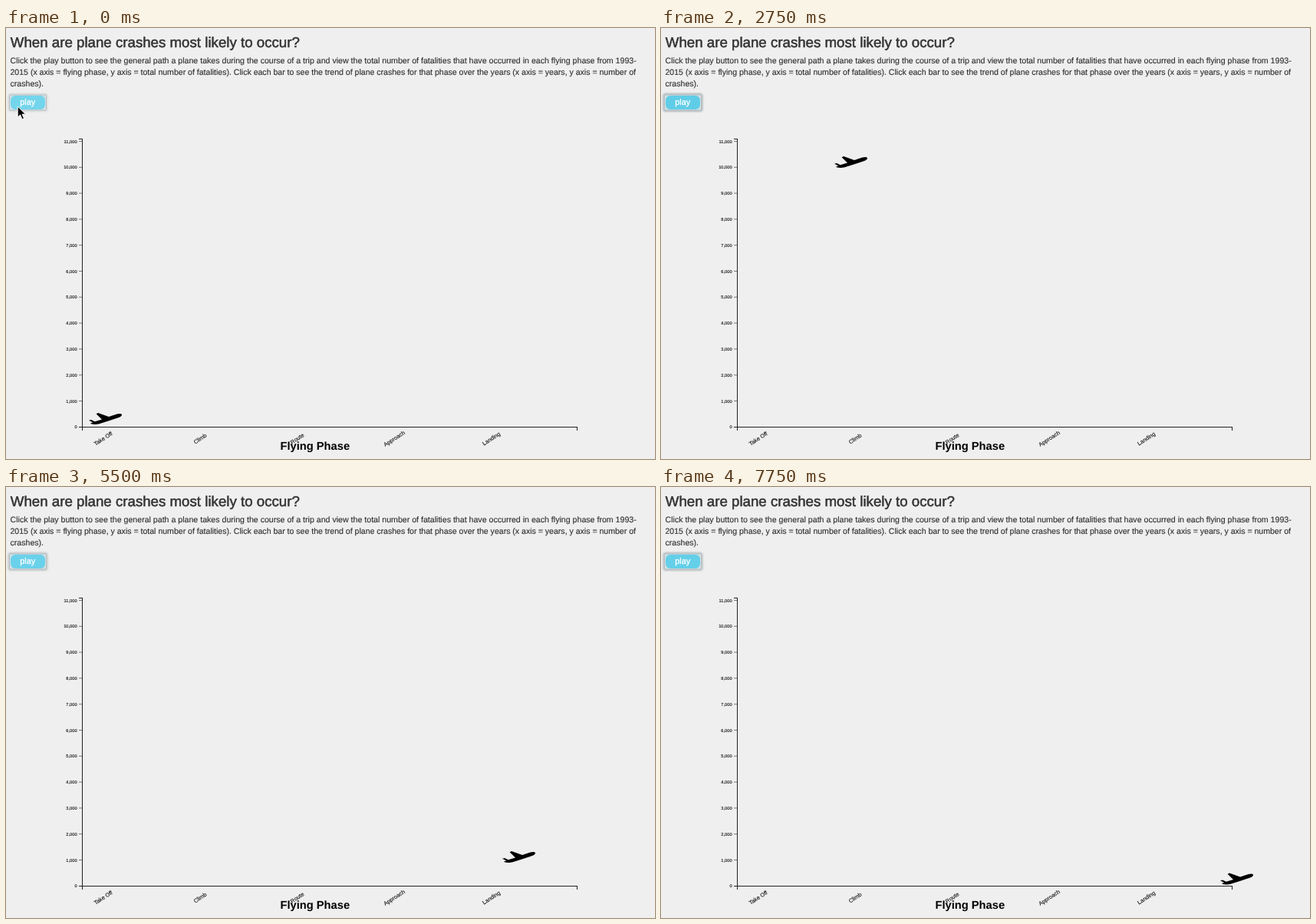
Write an HTML page that moves like this. It is 846x561 px and loops after 8000 ms.

```html
<!DOCTYPE html>
<html lang="en">
<head>
<meta charset="utf-8">
<title>Flying phases</title>
<style>
  html, body { margin: 0; width: 100%; height: 100%; overflow: hidden; background: #efefef; }
  svg { display: block; }
  text { font-family: "Liberation Sans", Arial, sans-serif; text-rendering: geometricPrecision; }
  .body { fill: #333; stroke: #333; stroke-width: .15; }
  .axis { fill: none; stroke: #222; stroke-width: 1; shape-rendering: crispEdges; }
  .tick { stroke: #777; stroke-width: 1; }
  .label { fill: #111; stroke: #111; stroke-width: .12; }
</style>
</head>
<body>
<svg id="stage" width="846" height="561" viewBox="0 0 846 561">
  <defs>
    <filter id="soft" x="-30%" y="-60%" width="160%" height="220%"><feGaussianBlur stdDeviation="1.3"/></filter>
  </defs>
  <rect width="846" height="561" fill="#efefef"/>
  <text x="5.8" y="25" font-size="18.7" fill="#333" stroke="#333" stroke-width=".5">When are plane crashes most likely to occur?</text>
  <g class="body">
    <text x="5.5" y="46" font-size="10.62">Click the play button to see the general path a plane takes during the course of a trip and view the total number of fatalities that have occurred in each flying phase from 1993-</text>
    <text x="5.5" y="61" font-size="10.56">2015 (x axis = flying phase, y axis = total number of fatalities). Click each bar to see the trend of plane crashes for that phase over the years (x axis = years, y axis = number of</text>
    <text x="5.5" y="76" font-size="10.6">crashes).</text>
  </g>
  <rect id="glow" x="4" y="86.5" width="49" height="21" rx="2" fill="none" stroke="#8f9a9e" stroke-width="3" filter="url(#soft)"/>
  <rect x="4.5" y="87" width="48" height="20" rx="1.5" fill="#d6e0e3" stroke="#b2bec2"/>
  <rect id="button" x="6" y="88" width="45" height="18" rx="6"/>
  <text x="28.3" y="100" font-size="10.9" fill="#fff" stroke="#fff" stroke-width=".3" text-anchor="middle">play</text>
  <g id="chart"></g>
  <text x="357.5" y="549.3" font-size="14.7" font-weight="bold">Flying Phase</text>
  <path id="plane" d="M0 9.7 L3 9 L7.8 11.3 L17 8.5 L9.6 1.2 L12 0 L26 5 L36.5 1.6 Q42 .2 43 2.2 Q43.2 4.2 39 5.9 L27 10 L13.5 14.3 Q8 15.4 3.6 14.4 L2 13.3 L5.4 12.5 Z"/>
  <path id="cursor" d="M15.2 102 V116.2 L18.6 113 L21 118.7 L23.5 117.6 L21.1 112.2 H25.6 Z" fill="#000" stroke="#fff" stroke-width="1"/>
</svg>
<script>
const LOOP = 8000, STEP = 250;
const $ = id => document.getElementById(id);

function add(parent, tag, attrs, text) {
  const el = document.createElementNS('http://www.w3.org/2000/svg', tag);
  for (const k in attrs) el.setAttribute(k, attrs[k]);
  if (text) el.textContent = text;
  return parent.appendChild(el);
}

function drawChart() {
  const chart = $('chart');
  add(chart, 'path', { class: 'axis', d: 'M95 144.5H99.5V519.5H95M99.5 524V519.5H744.5V524' });
  for (let i = 0; i <= 11; i++) {
    const y = 519.3 - i * 33.8;
    if (i) add(chart, 'path', { class: 'tick', d: `M95 ${y}H99` });
    add(chart, 'text', { class: 'label', x: 92.6, y: y + 2.1, 'font-size': 5.7, 'text-anchor': 'end' },
      (i * 1000).toLocaleString('en-US'));
  }
  ['Take Off', 'Climb', 'Route', 'Approach', 'Landing'].forEach((name, i) => {
    add(chart, 'text', {
      class: 'label', transform: `translate(${126.6 + i * 126.5} 534.5) rotate(-33)`,
      y: 2.5, 'font-size': 7.3, 'text-anchor': 'middle'
    }, name);
  });
}

// Flight path: time, x, y; the outer points only shape the ends
const path = [
  [-750, 94, 511], [0, 108, 501], [750, 136, 468], [1250, 153, 425], [1750, 159, 355],
  [2500, 180, 214], [2750, 226, 167], [3250, 360, 144], [3750, 476, 244], [4500, 535, 398],
  [5000, 594, 450], [5500, 647, 474], [6250, 698, 495], [7000, 722.5, 499.3],
  [7750, 729, 502.5], [8250, 729.4, 502.8], [8750, 729.4, 502.8]
];

const rate = (i, c) => (path[i + 1][c] - path[i][c]) / (path[i + 1][0] - path[i][0]);

function slope(i, c) {
  const before = path[i][0] - path[i - 1][0], after = path[i + 1][0] - path[i][0];
  return (rate(i - 1, c) * after + rate(i, c) * before) / (before + after);
}

function along(t, c) {
  let i = 1;
  while (path[i + 1][0] <= t) i++;
  const h = path[i + 1][0] - path[i][0], u = (t - path[i][0]) / h, v = 1 - u;
  return path[i][c] * v * v * (1 + 2 * u) + path[i + 1][c] * u * u * (3 - 2 * u)
    + h * u * v * (slope(i, c) * v - slope(i + 1, c) * u);
}

function render(t) {
  $('plane').setAttribute('transform', `translate(${along(t, 1)} ${along(t, 2)})`);
  const pulse = .5 + .5 * Math.cos((t - 2150) / 4650 * 2 * Math.PI);
  const mix = (a, b) => Math.round(a + (b - a) * pulse);
  $('button').setAttribute('fill', `rgb(${mix(115, 92)},${mix(213, 203)},${mix(236, 231)})`);
  $('glow').setAttribute('opacity', .25 + .5 * pulse);
  $('cursor').setAttribute('visibility', t < 750 ? 'visible' : 'hidden');
}

drawChart();
const start = performance.now();
function tick(now) {
  const t = Math.max(0, now - start) % LOOP;
  render(Math.floor(t / STEP) * STEP);
  requestAnimationFrame(tick);
}
render(0);
requestAnimationFrame(tick);
</script>
</body>
</html>
```
